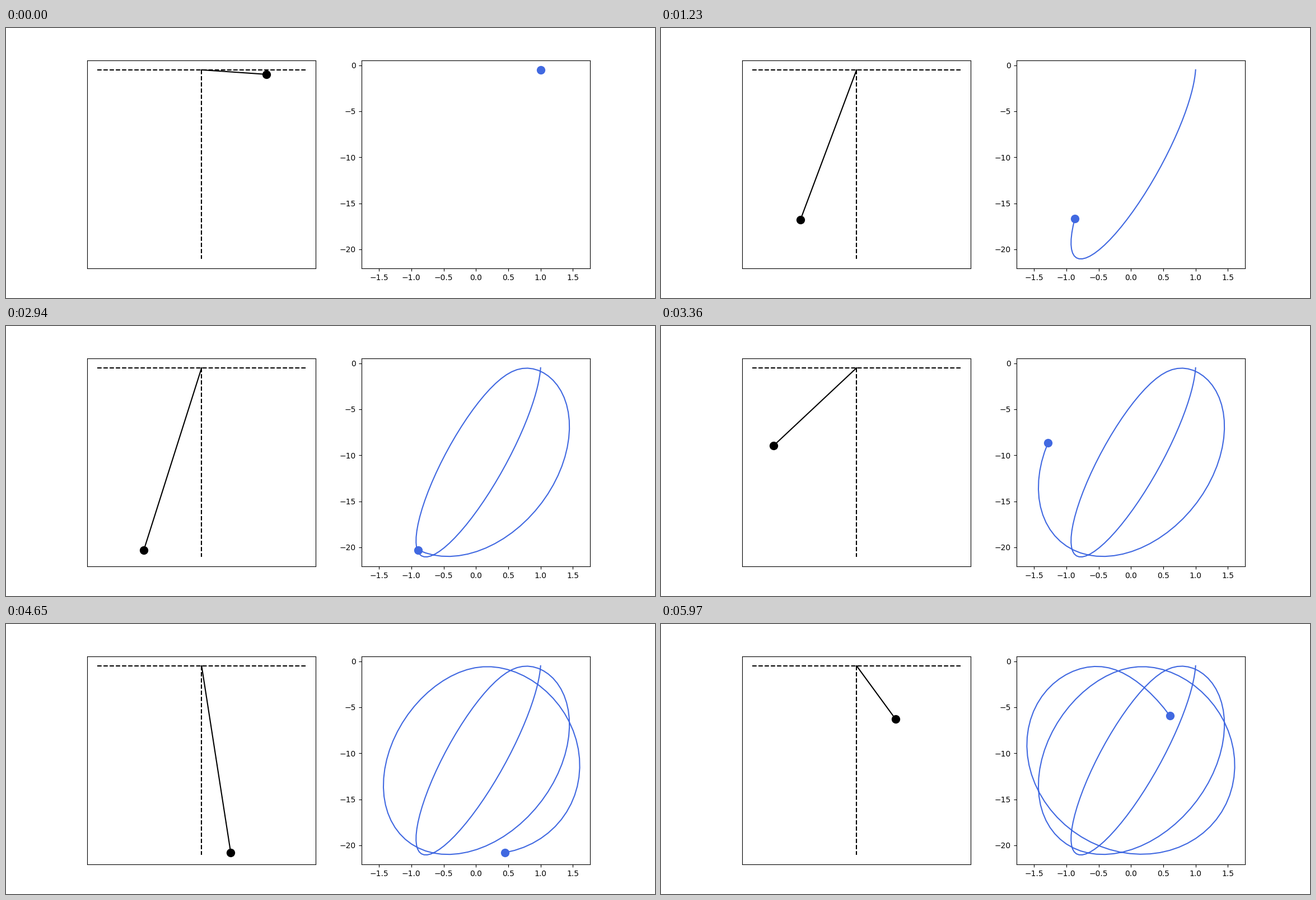
These frames come from a looping animation (1159x483 px, 6 s). A matplotlib script:

```python
import numpy as np
import matplotlib.pyplot as plt
from matplotlib.animation import FuncAnimation

DPI = 100
FRAMES = 200
INTERVAL = 30
SUBSTEPS = 20

G, STIFFNESS, MASS, REST = 9.8, 1.0, 1.0, 1.0


def deriv(s):
    """Spring pendulum: s = [x, y, vx, vy], pivot at the origin."""
    pos, vel = s[:2], s[2:]
    r = np.hypot(*pos)
    acc = -STIFFNESS / MASS * (r - REST) * pos / r
    acc[1] -= G
    return np.concatenate([vel, acc])


def rk4(s, h):
    a = deriv(s)
    b = deriv(s + h / 2 * a)
    c = deriv(s + h / 2 * b)
    d = deriv(s + h * c)
    return s + h / 6 * (a + 2 * b + 2 * c + d)


def simulate():
    t = np.linspace(0, 20, FRAMES)
    h = (t[1] - t[0]) / SUBSTEPS
    s = np.array([1.0, -0.5, 0.0, 0.0])
    path = [s[:2]]
    for _ in t[1:]:
        for _ in range(SUBSTEPS):
            s = rk4(s, h)
        path.append(s[:2])
    return np.array(path).T


x, y = simulate()

fig, (left, right) = plt.subplots(1, 2, figsize=(1159 / DPI, 483 / DPI), dpi=DPI)

left.plot([x.min(), x.max()], [0, 0], "k--")
left.plot([0, 0], [0, y.min()], "k--")
rod, = left.plot([0, x[0]], [0, y[0]], "k")
bob, = left.plot(x[:1], y[:1], "ko", markersize=10)
left.set_xticks([])
left.set_yticks([])

# The full path fixes the limits before the trace is cut short
trace, = right.plot(x, y, color="royalblue")
tip, = right.plot(x[:1], y[:1], "o", color="royalblue", markersize=10)
for ax in (left, right):
    ax.set_xlim(ax.get_xlim())
    ax.set_ylim(ax.get_ylim())


def update(i):
    rod.set_data([0, x[i]], [0, y[i]])
    trace.set_data(x[:i + 1], y[:i + 1])
    for dot in (bob, tip):
        dot.set_data([x[i]], [y[i]])
    return rod, bob, trace, tip


anim = FuncAnimation(fig, update, frames=FRAMES, interval=INTERVAL, repeat=True, repeat_delay=0)
plt.show()
```
